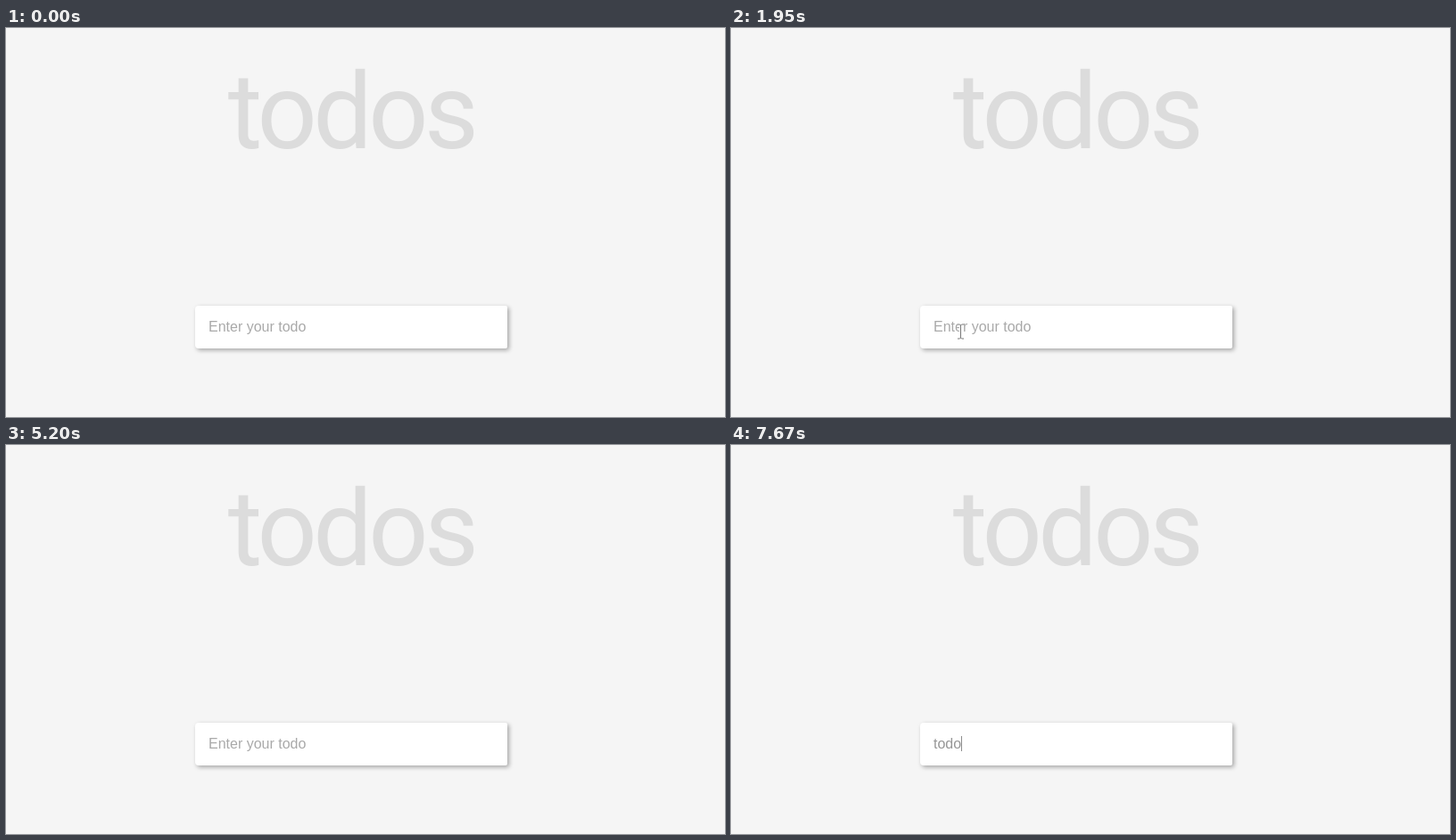
An HTML page that plays this animation: 806 px wide and 437 px high, repeating every 8 s.

```html
<!DOCTYPE html>
<html lang="en">
<head>
<meta charset="utf-8">
<title>todos</title>
<style>
html, body { margin: 0; width: 100%; height: 100%; overflow: hidden; background: #f5f5f5; }
h1, .box, .text, .caret, svg { position: absolute; margin: 0; }
h1 {
  left: 87px; top: 35px; width: 600px; text-align: center; white-space: nowrap;
  font: 400 118px/120px Roboto, sans-serif; letter-spacing: -4.6px; color: #dcdcdc;
}
.box {
  left: 212px; top: 312px; width: 350px; height: 48px;
  background: #fff; border-radius: 4px 2px 2px 4px;
  box-shadow: 2px 2px 5px rgba(0, 0, 0, .33);
}
.text {
  left: 227px; top: 327px; white-space: pre;
  font: 16px/18px "Liberation Sans", Arial, sans-serif;
}
.caret { top: 327px; width: 1px; height: 17px; background: #8c8c8c; }
svg { left: 0; top: 0; overflow: visible; }
</style>
</head>
<body>
<h1>todos</h1>
<div class="box"></div>
<div class="text" id="text"></div>
<div class="caret" id="caret"></div>
<svg width="806" height="437">
  <path id="arrow" d="M.5 .5v15l3.5-3.3 2.4 5.6 2.3-1-2.4-5.4h4.8z" fill="#222" stroke="#fff"/>
  <g id="beam" fill="none">
    <path d="M-3.5-8h2.5l1 1 1-1h2.5M0-7v14M-3.5 8h2.5l1-1 1 1h2.5" stroke="#fff" stroke-width="3"/>
    <path d="M-3.5-8h2.5l1 1 1-1h2.5M0-7v14M-3.5 8h2.5l1-1 1 1h2.5" stroke="#777"/>
  </g>
</svg>
<script>
const LOOP = 8000, STEP = 130;
const $ = id => document.getElementById(id);
const text = $('text'), caret = $('caret'), arrow = $('arrow'), beam = $('beam');

// [time, x, y] of the pointer
const path = [[130, 216, 401], [260, 254, 371], [390, 311.5, 345], [520, 276.5, 337],
  [650, 257.5, 340], [1040, 257.5, 341]];
const pointerEnd = 2990;
// times at which the caret turns on and off in turn
const blinks = [1430, 1950, 2080, 2730, 3250, 3900, 4550, 5200, 5850, 6370, 7020];
const typed = [[7020, 't'], [7280, 'to'], [7540, 'tod'], [7670, 'todo']];
const caretX = { '': 227, t: 231, to: 240, tod: 249, todo: 258 };

const latest = (list, t) => list.filter(k => k[0] <= t).pop();

function place(el, on, x, y) {
  el.style.display = on ? '' : 'none';
  if (on) el.setAttribute('transform', `translate(${x} ${y})`);
}

function draw(t) {
  const word = (latest(typed, t) || [0, ''])[1];
  text.textContent = word || 'Enter your todo';
  text.style.color = word ? (t < 7540 ? '#a2a2a2' : '#969696')
    : t >= 2080 && t < 3120 ? '#b0b0b0' : '#a9a9a9';

  caret.style.left = caretX[word] + 'px';
  caret.style.display = blinks.filter(b => b <= t).length % 2 ? '' : 'none';

  const p = t < pointerEnd && latest(path, t);
  const inside = p && p[2] < 360;
  place(arrow, p && !inside, ...(p || []).slice(1));
  place(beam, inside, ...(p || []).slice(1));
}

function tick() {
  const t = performance.now() % LOOP;
  draw(Math.floor(t / STEP + 1e-6) * STEP);
  requestAnimationFrame(tick);
}
draw(0);
tick();
</script>
</body>
</html>
```
